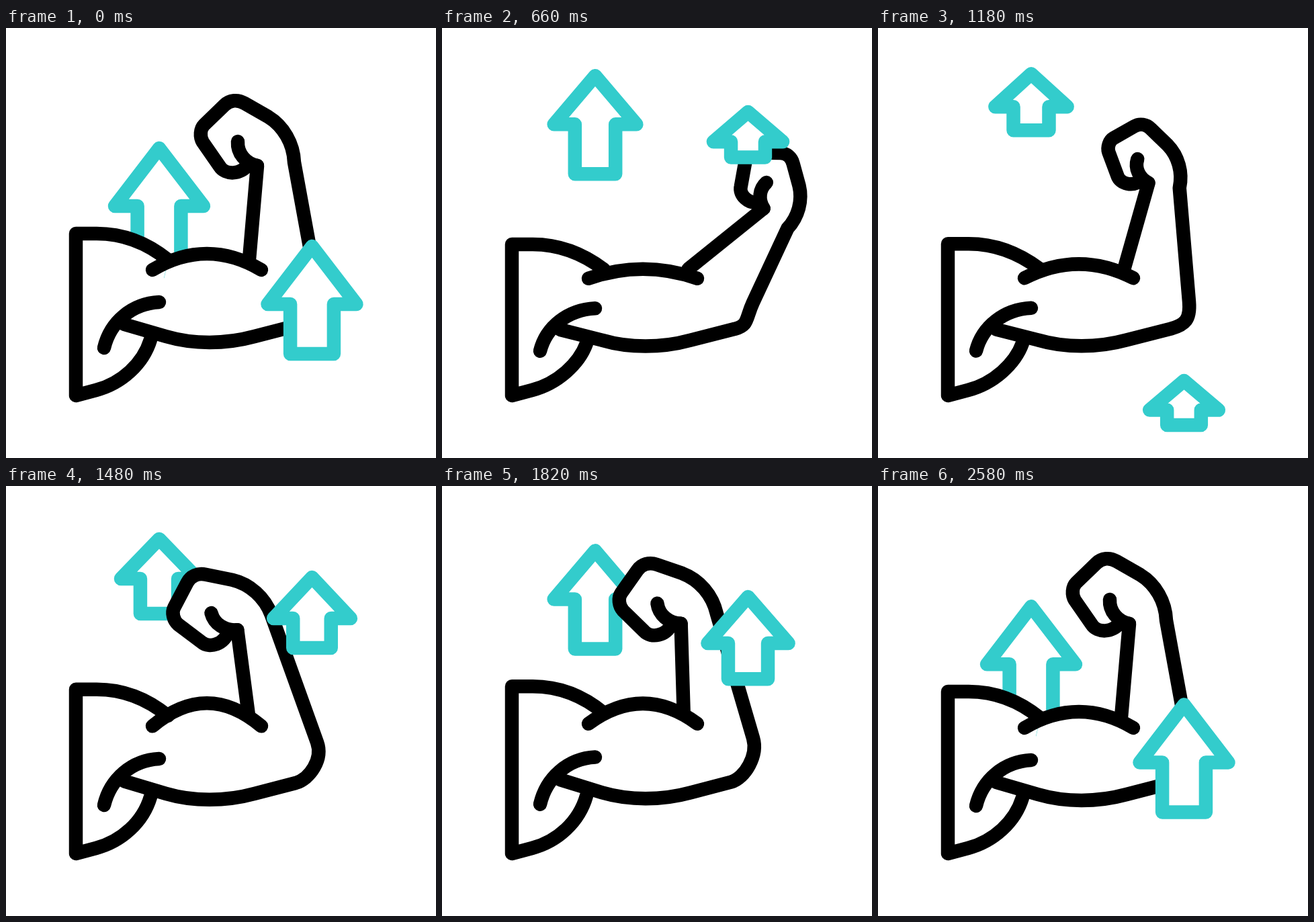
These frames come from a looping animation (640 by 640 pixels, 2.76 s). An HTML page with a canvas:

```html
<!DOCTYPE html>
<html lang="en">
<head>
<meta charset="utf-8">
<title>Flexing arm</title>
<style>
  html, body { margin: 0; width: 100%; height: 100%; overflow: hidden; background: #fff; }
  canvas { display: block; width: 100vw; height: 100vh; }
</style>
</head>
<body>
<canvas id="stage" width="640" height="640"></canvas>
<script>
const ctx = document.getElementById('stage').getContext('2d');
const LOOP = 2760, DELAY = 200, STEP = 20, LAST = 119, HALF = 12;

const mix = (a, b, u) => a + (b - a) * u;
const wave = u => .5 - .5 * Math.cos(Math.PI * u);
const ease = u => wave(Math.min(1, Math.max(0, u)));
const easeOut = (u, power) => 1 - (1 - u) ** power;

// Shoulder drop: stretch, swing between two extremes, settle.
function bodyDrop(k) {
  const high = 16, low = -11, from = 23.7, to = from + 7 * HALF;
  if (k < from) return high * Math.sin(Math.PI / 2 * k / from);
  if (k > to) return mix(low, 0, ease((k - to) / (LAST - to)));
  return mix(high, low, wave((k - from) / HALF));
}

// Hand angle: one wide reach first, then it follows the shoulder a little late.
function handAngle(k) {
  const high = 14.5, low = -22, from = 37.5, to = from + 6 * HALF;
  if (k < from) return mix(46 * ease(k / 22), low, ease((k - 22) / 13));
  if (k > to) return mix(low, 0, ease((k - to) / (LAST - to)));
  return mix(low, high, wave((k - from) / HALF));
}

const left = {
  x: 228, rest: 179, top: 77.5, bottom: 346, full: 183, small: 98,
  start: 27.8, period: 23.1, launch: 3.4, shed: 38,
  pace: 3.05, snap: 3.1, grow: 5.2, loss: 104, fade: .45, taper: [.125, .375, .06]
};
const right = {
  x: 455.5, rest: 325, top: 135, bottom: 525, full: 160, small: 66,
  start: 25, period: 24, launch: 4.1, shed: 93,
  pace: 4.12, snap: 3.73, grow: 4.5, loss: 68, fade: .34, taper: [.156, .4516, .0753]
};

// Leave the rest pose, fly up three times from below, then stop at rest.
function flight(a, k) {
  const n = Math.floor((k - a.start) / a.period);
  const drift = u => 14 * u ** 4;
  if (n < 0) {
    const u = k / a.start;
    return {
      tip: mix(a.rest, a.top, easeOut(u, a.launch)) - drift(u),
      height: a.full - a.shed * easeOut(u, 2)
    };
  }
  const j = k - a.start - n * a.period;
  const below = 1 / (1 + (j / a.pace) ** a.snap);
  if (n === 3) return {
    tip: mix(a.rest, a.bottom, below),
    height: mix(a.small, a.full, ease(j / 14))
  };
  const spent = Math.max(0, (j - a.grow) / (a.period - a.grow));
  return {
    tip: mix(a.top, a.bottom, below) - drift(j / a.period),
    height: mix(a.small, a.full, ease(j / a.grow)) - a.loss * spent ** a.fade
  };
}

function paint(paths, color) {
  ctx.fillStyle = '#fff';
  ctx.strokeStyle = color;
  paths.forEach(p => ctx.fill(p));
  paths.forEach(p => ctx.stroke(p));
}

function drawArrow(arrow, k) {
  const { x, full, taper } = arrow;
  const { tip, height } = flight(arrow, k);
  const lost = full - height;
  const wing = 66 - taper[0] * lost;
  const neck = tip + 86 - taper[1] * lost;
  const shaft = 32.4 - taper[2] * lost;
  const foot = tip + height;
  paint([new Path2D(`M${x} ${tip}L${x + wing} ${neck}H${x + shaft}V${foot}
    H${x - shaft}V${neck}H${x - wing}Z`)], '#33cccc');
}

function drawArm(k) {
  const d = bodyDrop(k), a = handAngle(k), rad = a * Math.PI / 180;
  const size = 1 - .01 * Math.max(0, d);
  const cos = size * Math.cos(rad), sin = size * Math.sin(rad);
  const wrist = [
    374 + 1.83 * a + .011 * a * a,
    205 + d + 14 * (1 - Math.exp(-a * a / 150)) + 1.6 * Math.max(0, a - 24)
  ];
  // Hand points are given in the rest pose and turn about the inner wrist.
  const turn = (x, y) => [
    wrist[0] + (x - 374) * cos - (y - 205) * sin,
    wrist[1] + (x - 374) * sin + (y - 205) * cos
  ];
  const bend = (...n) => {
    let out = '';
    for (let i = 0; i < n.length; i += 2) out += turn(n[i], n[i + 1]) + ' ';
    return out;
  };

  const outer = turn(429, 200);
  const elbow = [463, 386 + 1.4 * d];
  const dx = elbow[0] - outer[0], dy = elbow[1] - outer[1], len = Math.hypot(dx, dy);
  const under = .35 * d;
  const heel = [432 + .25 * d, 443 + .3 * d];
  const base = [362 + .3 * d, 344 + .9 * d];
  const ends = 360 + .8 * d;
  const bulge = 24 - a * (a < 0 ? .56 : .22);

  const torso = `M215 ${464 + under}C204 500 172 529 134 539L104 547V${306 + d}H135
    C175 ${306 + d} 210 ${320 + d} 241 ${345 + .9 * d}`;
  const inside = `M241 ${347 + .9 * d}L${base}L300 450L176 ${441 + .5 * d}L215 ${464 + under}Z`;
  const arm = `M176 ${441 + .5 * d}L238 ${459 + under}
    C279 ${471 + under} 326 ${471 + under} 370 ${459 + under}L${heel}
    C${heel[0] + 21} ${heel[1] - 6} ${elbow[0] + 27 * dx / len} ${elbow[1] + 27 * dy / len} ${elbow}
    L${outer}C${bend(428, 172, 413, 146, 390, 132)}L${bend(355, 112)}
    C${bend(345, 106, 333, 107, 325, 115)}L${bend(295, 144)}
    C${bend(289, 150, 288, 162, 293, 170)}L${bend(318, 206)}
    C${bend(326, 219, 350, 219, 360, 203)}L${wrist}L${base}`;
  const thumb = `M${bend(345, 169)}C${bend(344, 186, 356, 201, 374, 205)}`;
  const biceps = `M218 ${ends}Q299 ${ends - 2 * bulge} 380 ${ends}`;
  const crease = `M228 ${408 + .58 * d}C187 ${410 + .58 * d} 155 ${438 + .45 * d} 146 ${476 + .3 * d}`;

  ctx.fillStyle = '#fff';
  ctx.fill(new Path2D(inside));
  paint([torso, arm, thumb, biceps, crease].map(s => new Path2D(s)), '#000');
}

function frame(now) {
  const step = Math.floor((now % LOOP - DELAY) / STEP);
  const k = Math.min(LAST, Math.max(0, step));
  ctx.fillStyle = '#fff';
  ctx.fillRect(0, 0, 640, 640);
  ctx.lineWidth = 20.5;
  ctx.lineCap = ctx.lineJoin = 'round';
  drawArrow(left, k);
  drawArm(k);
  drawArrow(right, k);
  requestAnimationFrame(frame);
}
requestAnimationFrame(frame);
</script>
</body>
</html>
```
